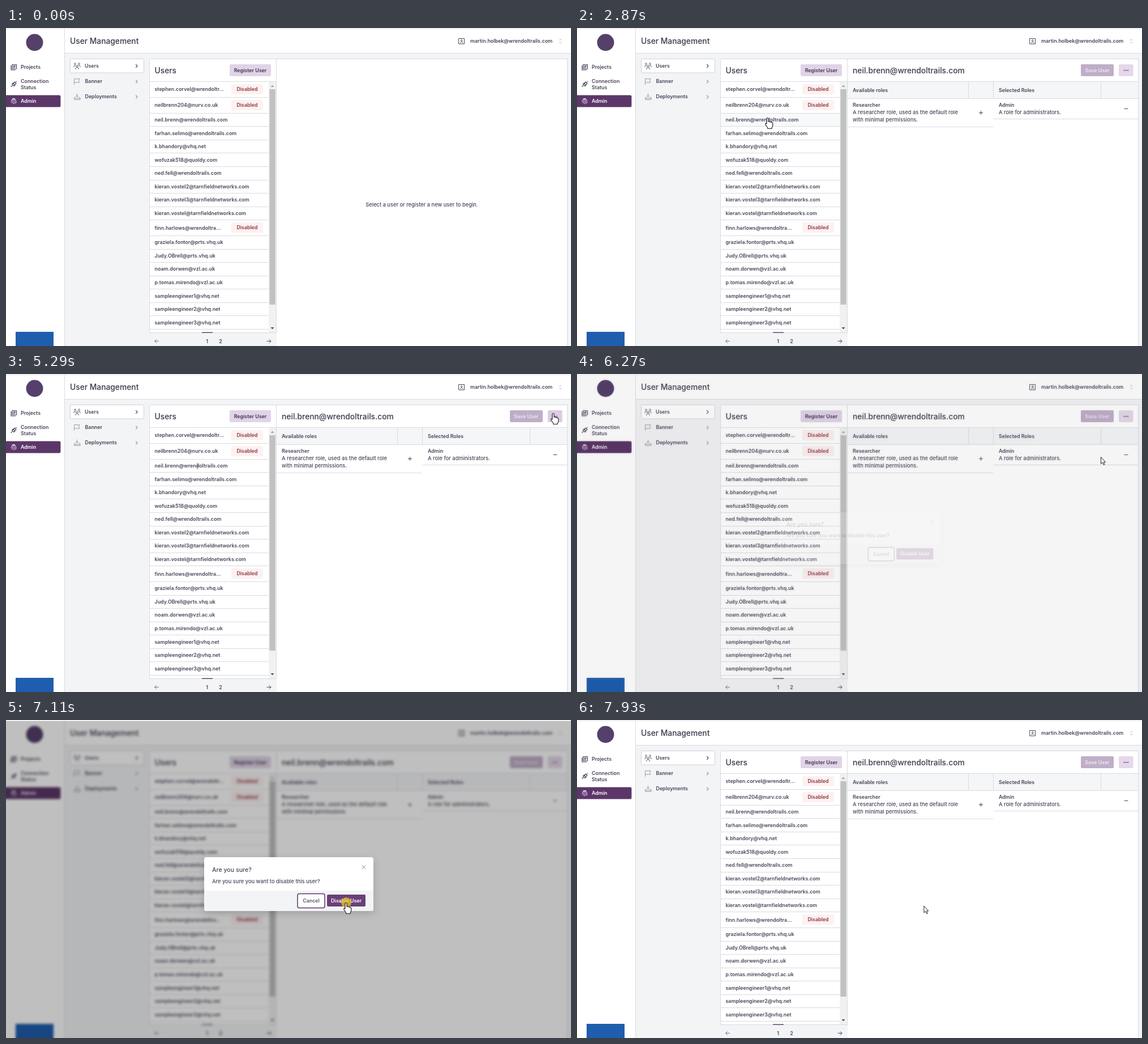
An HTML page that plays this animation: 998x561 px, repeating every 8000 ms.

```html
<!DOCTYPE html>
<html lang="en">
<head>
<meta charset="utf-8">
<title>User Management</title>
<style>
html, body { margin: 0; width: 100%; height: 100%; overflow: hidden; background: #fff; }
svg, #shade { position: absolute; left: 0; top: 0; width: 998px; height: 561px; }
#shade { top: 2px; height: 559px; background: rgba(0,0,0,.25); backdrop-filter: blur(2px); }
text { font-family: Inter, sans-serif; white-space: pre; }
.icon { fill: none; stroke: #48455a; stroke-width: 1; stroke-linecap: round; stroke-linejoin: round; }
#card { transform-origin: 499.5px 289.5px; filter: drop-shadow(0 4px 7px rgba(0,0,0,.16)); }
</style>
</head>
<body>
<svg id="page" viewBox="0 0 998 561"></svg>
<div id="shade"></div>
<svg id="front" viewBox="0 0 998 561"></svg>
<script>
const INK = '#48445a', LINE = '#d9dbe1', GREY = '#f3f4f6', PURPLE = '#5c3669';
const $ = id => document.getElementById(id);

const text = (x, y, str, { size = 8.85, weight = 600, fill = INK, anchor = 'start' } = {}) =>
  `<text x="${x}" y="${y + size * .35}" font-size="${size}" font-weight="${weight}" fill="${fill}" text-anchor="${anchor}">${str}</text>`;
const rect = (x, y, w, h, fill, more = '') =>
  `<rect x="${x}" y="${y}" width="${w}" height="${h}" fill="${fill}" ${more}/>`;
const hline = (x, y, w) => rect(x, y, w, 1, LINE);
const vline = (x, y, h) => rect(x, y, 1, h, LINE);
const icon = (x, y, d, color = '#48455a', width = 1) =>
  `<path class="icon" transform="translate(${x} ${y})" d="${d}" style="stroke:${color};stroke-width:${width}"/>`;
const button = (x, y, w, h, fill, label, color = '#443350') =>
  rect(x, y, w, h, fill, 'rx="2"') +
  text(x + w / 2, y + h / 2, label, { fill: color, anchor: 'middle' });
const title = { size: 13.8, weight: 500, fill: '#3b384b' };
const body = { size: 9.3, weight: 500 };

// A leading "!" marks a disabled account.
const accounts = [
  '!stephen.corvel@wrendoltr...', '!neilbrenn204@nurv.co.uk', 'neil.brenn@wrendoltrails.com',
  'farhan.selimo@wrendoltrails.com', 'k.bhandory@vhq.net', 'wofuzak518@quoldy.com',
  'ned.fell@wrendoltrails.com', 'kieran.vostel2@tarnfieldnetworks.com',
  'kieran.vostel3@tarnfieldnetworks.com', 'kieran.vostel@tarnfieldnetworks.com',
  '!finn.harlows@wrendoltra...', 'graziela.fontor@prts.vhq.uk', 'Judy.OBrell@prts.vhq.uk',
  'noam.dorwen@vzl.ac.uk', 'p.tomas.mirendo@vzl.ac.uk', 'sampleengineer1@vhq.net',
  'sampleengineer2@vhq.net', 'sampleengineer3@vhq.net'
];
let edge = 95;
const rows = accounts.map(a => {
  const off = a[0] === '!', h = off ? 27.9 : 23.55, y = edge;
  edge += h;
  return { name: a.replace('!', ''), off, y, h };
});

const rowMarkup = ({ name, off, y, h }) =>
  hline(254, Math.round(y + h) - 1, 210) + text(262.5, y + h / 2 - .6, name) +
  (off ? button(398, Math.round(y + h / 2) - 10, 56, 18, '#fdf1f1', 'Disabled', '#8f3a42') : '');

const sidebar =
  rect(0, 0, 103, 561, '#fff') + vline(103, 2, 559) +
  '<circle cx="50.5" cy="25.5" r="15" fill="#54406a"/>' +
  icon(8.5, 64, 'M2.5 .5h7.5v7.5h-7.5zM.5 2.5v7.5h7.5M4.5 2.5h3.5M4.5 4.3h3.5M4.5 6h2', INK, 1.2) +
  text(26, 69, 'Projects') +
  icon(8.5, 93, 'M.5 10.5l2-2M2 6l3.5 3.5l2-1.5l-4-4zM5 4l1.5-2l3 3l-2 1.5M8 3.5l2.2-2.5M4 5.5l2-2', INK, 1.1) +
  text(26, 93.5, 'Connection') + text(26, 104.5, 'Status') +
  rect(-3, 118.4, 99.4, 21, PURPLE, 'rx="2.5"') +
  icon(8.5, 123.5, 'M1 3.5a5 5 0 0 1 8 0M.5 7a4.5 4.2 0 0 1 9 0v1.5M2.5 9.5v-2a2.5 2.5 0 0 1 5 0v2.5M5 7.5v3M3 1h4', '#eee4f2', .9) +
  text(26, 128.5, 'Admin', { fill: '#fff' }) +
  rect(17, 536, 67, 25, '#1f5eae');

const header =
  rect(104, 0, 894, 44, '#fff') + hline(104, 44, 894) + rect(0, 1, 998, 1, '#e3e4e8') +
  text(113, 23, 'User Management', title) +
  icon(799.5, 18, 'M.5 .5h9.5v9.5h-9.5zM3 8c0-2 4.5-2 4.5 0M5.2 2.7a1.4 1.4 0 1 0 .1 0') +
  text(820, 22.5, 'martin.holbek@wrendoltrails.com') +
  icon(977, 19.5, 'M.5 2l1.7-1.7L4 2M.5 5.5l1.7 1.7L4 5.5', '#a7a8b2', .9);

const chevron = (y, color) => icon(229.5, y - 2.6, 'M0 0l2.6 2.6L0 5.2', color, 1.2);
const menu =
  rect(113.5, 54.5, 130, 24.5, '#fff', 'rx="2" stroke="#cfd2d9"') +
  icon(119.5, 61.5, 'M6 4.5a1.7 1.7 0 1 0 .1 0M3 11c0-3.8 6-3.8 6 0M2.5 .5a1.4 1.4 0 1 0 .1 0M9.5 .5a1.4 1.4 0 1 0 .1 0M.3 7c0-2 1.4-2.6 2.7-2.2M11.7 7c0-2-1.4-2.6-2.7-2.2') +
  text(139, 66.5, 'Users') + chevron(67, INK) +
  icon(120, 89, 'M.5 10.5V.7H10L8.3 3.8L10 7H.5', '#9b9ca6') +
  text(139.5, 94, 'Banner') + chevron(94.5, '#94959f') +
  icon(120, 115.5, 'M5.5 .5v5M3.5 3.8l2 2l2-2M2.5 6L.5 8v2.7h10.5V8l-2-2M.5 8.5h10.5', '#9b9ca6') +
  text(139.5, 121, 'Deployments') + chevron(121.5, '#94959f');

const list =
  rect(253.5, 54.5, 224, 483, '#fff', `stroke="${LINE}" rx="3"`) +
  text(262.5, 75, 'Users', title) + button(395, 64, 73, 21, '#e0d4e7', 'Register User') +
  hline(254, 94, 223) + rect(254, 0, 210, 0, '#f8f9fb', 'id="hover"') +
  rows.map(rowMarkup).join('') +
  rect(337.5, 157, 1, 11, '#55525f', 'id="caret"') +
  rect(464, 95, 13, 442, '#f1f1f1') + rect(465.4, 108, 10.4, 380, '#c1c1c1', 'id="thumb"') +
  '<path d="M467.5 104l3-3.5l3 3.5z" fill="#a3a3a3"/><path d="M467.5 528l3 3.5l3-3.5z" fill="#505050"/>' +
  rect(253, 537, 225, 24, GREY) + hline(253, 537, 225) + rect(346, 536.5, 19, 1.5, '#5b4a68') +
  icon(262.5, 552.5, 'M7 0H0M3 -3L0 0l3 3', '#777582') +
  icon(461, 552.5, 'M0 0h7M4 -3l3 3l-3 3') +
  text(355, 552.5, '1', { anchor: 'middle' }) + text(379, 552.5, '2', { anchor: 'middle' });

const details =
  rect(478, 54, 514, 507, '#fff', 'rx="3"') + vline(477, 54, 483) + hline(478, 54, 514) + vline(991, 55, 506) +
  `<g id="empty">${text(734.5, 311.5, 'Select a user or register a new user to begin.', { ...body, anchor: 'middle' })}</g>` +
  '<g id="user">' +
  text(487, 75, 'neil.brenn@wrendoltrails.com', title) +
  button(890, 64, 58, 21, '#bfaec8', 'Save User', '#eee8f1') +
  rect(957, 64, 25.5, 21, '#e5d8ea', 'rx="2" id="more"') +
  [966.5, 969.8, 973.1].map(x => `<circle cx="${x}" cy="74.7" r="1" fill="${INK}"/>`).join('') +
  rect(478, 95, 513, 29, '#f5f6f8') + hline(478, 94, 514) + hline(478, 124, 514) +
  vline(691, 95, 29) + vline(735, 95, 29) + vline(925, 95, 29) +
  text(487, 110, 'Available roles') + text(745, 110, 'Selected Roles') +
  text(487, 135.5, 'Researcher') +
  text(487, 148.8, 'A researcher role, used as the default role', body) +
  text(487, 162, 'with minimal permissions.', body) +
  text(745, 135.5, 'Admin') + text(745, 148.8, 'A role for administrators.', body) +
  hline(478, 174, 257) + hline(736, 160, 255) +
  icon(713.5, 149.5, 'M-3 0h6M0 -3v6') + icon(970, 142.5, 'M-3 0h6') +
  '</g>';

$('page').innerHTML = rect(0, 0, 998, 561, GREY) + sidebar + header + menu + list + details;

const dialog =
  '<g id="card">' +
  rect(350, 242, 299, 95, '#fff', 'rx="4"') +
  `<path d="M350 301h299v32q0 4-4 4h-291q-4 0-4-4z" fill="${GREY}"/>` +
  text(364, 264.5, 'Are you sure?', { size: 10.6, weight: 500 }) +
  text(364, 284.5, 'Are you sure you want to disable this user?', body) +
  icon(632, 259.5, 'M-3 -3l6 6M3 -3l-6 6', '#85858f') +
  rect(515, 306.5, 48, 25, '#fff', `rx="3" stroke="${PURPLE}" stroke-width="1.5"`) +
  text(539, 319, 'Cancel', { anchor: 'middle', fill: '#5c5a68' }) +
  button(567, 308, 68, 21, '#6b3f7a', 'Disable User', '#fff') + '</g>';
const outline = 'fill="#fff" stroke="#25242d" stroke-linejoin="round"';
$('front').innerHTML = dialog +
  '<g id="cursor"><circle id="ring" fill="#e8c51c" fill-opacity=".75"/>' +
  `<path id="arrow" ${outline} d="M.5 .5V12.5L3.2 10L5.2 14.3L7 13.5L5.1 9.4H8.5Z"/>` +
  `<path id="hand" ${outline} stroke-width="1.2" d="M-2 10.5V2a1.5 1.5 0 0 1 3 0V7q2.4-.7 3 .8q2.2-.6 2.7 .9q2.1-.2 2.1 1.6V13.5q0 2.6-1.6 4V19.5H-.2V18L-4 12.5q-.9-2 .6-2.4q1 0 1.4 .9z"/></g>`;

// Pointer path: time, x, y
const path = [
  [520, 846, 548], [800, 694, 480], [1070, 694, 480], [1280, 470, 434], [1430, 470, 434],
  [1570, 424, 390], [1850, 333, 268], [2190, 336, 163], [2250, 337, 158], [3000, 337, 158],
  [3430, 709, 351], [3630, 709, 351], [3840, 738, 359], [4390, 843, 224], [4460, 843, 224],
  [5220, 959, 77], [5290, 967, 69], [5570, 967, 69], [5930, 925, 146], [6400, 925, 146],
  [6900, 601, 322], [7510, 601, 322], [7930, 612.4, 327.5]
];
const pointer = t => {
  const i = path.findIndex(k => k[0] > t);
  if (i < 1) return path[i < 0 ? path.length - 1 : 0].slice(1);
  const [a, b] = [path[i - 1], path[i]], p = (t - a[0]) / (b[0] - a[0]);
  return [a[1] + (b[1] - a[1]) * p, a[2] + (b[2] - a[2]) * p];
};
const clicks = [2320, 5400, 7040];
const within = (t, a, b) => t >= a && t < b;
const show = (id, on) => { $(id).style.display = on ? '' : 'none'; };
const set = (id, attrs) => { for (const k in attrs) $(id).setAttribute(k, attrs[k]); };

function draw(t) {
  const [x, y] = pointer(t);
  const overList = within(t, 1280, 6000) && within(x, 254, 464) && within(y, 95, 531);
  const overMore = within(t, 5000, 5700) && within(x, 957, 983) && within(y, 64, 85);
  const overDisable = within(t, 6600, 7180) && within(x, 567, 635) && within(y, 308, 329);
  const isHand = overList || overMore || overDisable;
  show('cursor', t >= 520);
  set('cursor', { transform: `translate(${x} ${y})` });
  show('hand', isHand);
  show('arrow', !isHand);

  const click = clicks.find(c => within(t, c, c + 140));
  set('ring', { r: click ? 4 + (t - click) / 14 : 0 });

  const row = overList && rows.find(r => within(y, r.y, r.y + r.h));
  set('hover', row ? { y: row.y, height: row.h - 1 } : { height: 0 });
  set('thumb', { fill: within(t, 1250, 1430) ? '#a8a8a8' : '#c1c1c1' });
  set('more', { fill: overMore ? '#dccbe3' : '#e5d8ea' });

  const selected = t >= 2520;
  show('user', selected);
  show('empty', !selected);
  show('caret', within(t, 3170, 5930) && (t - 3170) % 1060 < 530 || within(t, 7510, 7860));

  const open = within(t, 6250, 7180);
  const p = 1 - (1 - Math.min(1, Math.max(0, (t - 6250) / 300))) ** 2.5;
  show('shade', open);
  show('card', open);
  $('shade').style.opacity = $('card').style.opacity = p;
  $('card').style.transform = `scale(${.95 + .05 * p})`;
}

function tick() {
  draw(performance.now() % 8000);
  requestAnimationFrame(tick);
}
tick();
</script>
</body>
</html>
```
